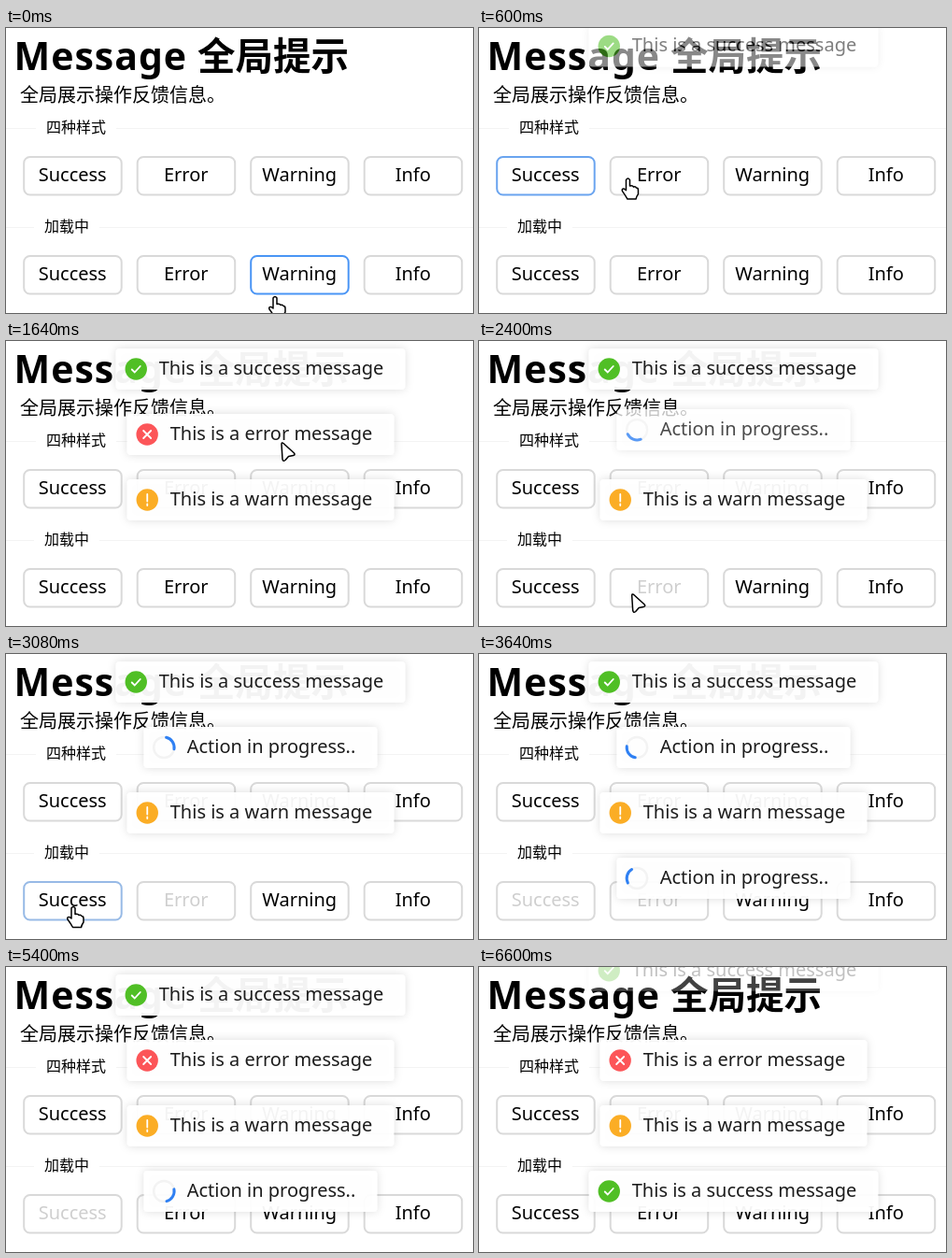
Write an HTML page that moves like this. It is 500 px wide and 305 px high and loops after 6720 ms.

```html
<!DOCTYPE html>
<html lang="zh">
<head>
<meta charset="utf-8">
<title>Message</title>
<style>
html, body { margin: 0; width: 100%; height: 100%; overflow: hidden; background: #fff; }
svg { display: block; width: 500px; height: 305px; }
text { font: 20px "Noto Sans", "Noto Sans CJK SC", "Noto Sans CJK", sans-serif; fill: #000; }
.title { font-size: 41px; font-weight: 700; letter-spacing: 1px; }
.title.cjk { font-size: 40.5px; letter-spacing: 0; }
.head { font-size: 16px; }
.btn { text-anchor: middle; }
.msg text { fill: #1c1c1c; }
.line { stroke: #f3f3f3; }
.cursor { fill: #fff; stroke: #000; stroke-width: 1.5; stroke-linejoin: round; }
</style>
</head>
<body>
<svg id="stage" viewBox="0 0 500 305">
  <defs>
    <filter id="shadow" x="-10%" y="-50%" width="120%" height="200%">
      <feDropShadow dx="0" dy="0" stdDeviation="5" flood-color="#000" flood-opacity=".14"/>
    </filter>
  </defs>
  <text class="title" x="8.5" y="44.5">Message</text>
  <text class="title cjk" x="205" y="45">全局提示</text>
  <text x="15" y="79">全局展示操作反馈信息。</text>
  <path class="line" d="M0 107.5H32M118 107.5H500M0 213.5H30M100 213.5H500"/>
  <text class="head" x="43" y="112">四种样式</text>
  <text class="head" x="41" y="218">加载中</text>
</svg>
<script>
const LOOP = 6720, LAST = 6600, LOADING = 2850, SPIN = 1140, REST = 180;
const stage = document.getElementById('stage');

function add(parent, tag, attrs, text) {
  const el = document.createElementNS('http://www.w3.org/2000/svg', tag);
  for (const k in attrs) el.setAttribute(k, attrs[k]);
  if (text) el.textContent = text;
  parent.appendChild(el);
  return el;
}

const clamp = v => Math.min(1, Math.max(0, v));
const mix = (a, b, p) => a + (b - a) * p;
const easeOut = u => 1 - (1 - clamp(u)) ** 2;
const easeInOut = u => u < .5 ? 4 * u ** 3 : 1 - 4 * (1 - u) ** 3;

// Places the pointer visits; it arrives REST ms before each click
const stops = [
  { x: 288, y: 287, click: 0 },
  { x: 78, y: 162, click: 500 },
  { x: 196, y: 160, click: 856 },
  { x: 297, y: 160, click: 1180 },
  { x: 295, y: 109, click: 1820 },
  { x: 167, y: 271, click: 2238 },
  { x: 72, y: 270, click: 3210 },
  { x: 62, y: 315, click: 3780 }
];
const [, onSuccess, onError, onWarning, , onLoadError, onLoadSuccess] = stops.map(s => s.click);

const buttons = [];
const hits = (b, p) => Math.abs(p.x - b.x) < 57 && Math.abs(p.y - b.y) < 25;
for (const y of [158, 264]) {
  ['Success', 'Error', 'Warning', 'Info'].forEach((name, i) => {
    const b = { x: 71.2 + i * 121.5, y };
    const g = add(stage, 'g', { class: 'btn' });
    b.box = add(g, 'rect', { x: b.x - 52, y: y - 20, width: 104.5, height: 40.5, rx: 6.5, fill: '#fff', 'stroke-width': 2 });
    b.label = add(g, 'text', { x: b.x, y: y + 5.5 }, name);
    b.stop = stops.find(s => hits(b, s));
    b.loads = y > 200 && b.stop && b.stop.click > 0;
    buttons.push(b);
  });
}

const kinds = {
  success: { color: '#50bf25', mark: 'M-4.5 .5L-1.5 3.5L4.5 -3', text: 'This is a success message' },
  error: { color: '#fc5558', mark: 'M-4 -4L4 4M4 -4L-4 4', text: 'This is a error message' },
  warn: { color: '#fbad25', mark: 'M0 -6V1.5M0 4.5V6', text: 'This is a warn message' },
  load: { text: 'Action in progress..' }
};
const messages = [];

function show(kind, slot, from, to = LOOP, slides = true) {
  const { color, mark, text } = kinds[kind], y = 30 + slot * 70;
  const g = add(stage, 'g', { class: 'msg' });
  const box = add(g, 'rect', { y: y - 22, height: 44, rx: 4, fill: '#fff', 'fill-opacity': .95, filter: 'url(#shadow)' });
  const label = add(g, 'text', { y: y + 6 }, text);
  const width = label.getComputedTextLength() + 69, x = 272.5 - width / 2;
  box.setAttribute('x', x);
  box.setAttribute('width', width);
  label.setAttribute('x', x + 46);
  const icon = add(g, 'g', { transform: `translate(${x + 21.5} ${y})`, fill: 'none', 'stroke-linecap': 'round' });
  let arc;
  if (color) {
    add(icon, 'circle', { r: 11.7, fill: color });
    add(icon, 'path', { d: mark, stroke: '#fff', 'stroke-width': 1.8 });
  } else {
    add(icon, 'circle', { r: 11, stroke: '#f3f3f3', 'stroke-width': 2.5 });
    arc = add(icon, 'path', { d: 'M8 -7.5A11 11 0 0 1 8 7.5', stroke: '#2f80f3', 'stroke-width': 3 });
  }
  messages.push({ g, arc, from, to, slides });
}

// A loading message that turns into its result in place
function load(result, slot, from) {
  show('load', slot, from, from + LOADING);
  show(result, slot, from + LOADING, LOOP, false);
}

show('success', 0, onSuccess, 6456);
show('error', 1, onError, 1700);
show('warn', 2, onWarning);
load('error', 1, onLoadError);
load('success', 3, onLoadSuccess);

const hand = add(stage, 'path', { class: 'cursor', d: 'M-2 2Q0 -1 2 2V8.5Q5 7.5 6 9.5Q8 8.5 9 10.5Q11 10.5 11 13V17Q9 20 8.5 22.5H-.5Q-3 18 -6 14Q-7 11 -4 11.5L-2 13Z' });
const arrow = add(stage, 'path', { class: 'cursor', d: 'M0 1.5Q0 -1 2 .5L13.5 11Q15 13 12.5 13.5L7.5 14.5L4 18.5Q1.5 20.5 1 17.5Z' });

function pointer(t) {
  const i = stops.findIndex(s => t < s.click);
  if (i < 1) return stops[i < 0 ? stops.length - 1 : 0];
  const a = stops[i - 1], b = stops[i];
  const p = easeInOut(clamp((t - a.click) / (b.click - REST - a.click)));
  return { x: mix(a.x, b.x, p), y: mix(a.y, b.y, p) };
}

function drawButton(b, t) {
  const since = b.stop ? t - b.stop.click : LOOP;
  b.off = b.loads && since >= 0 && since < LOADING;
  const glow = b.off ? 0 : clamp(Math.min(1 + since / 240, 1 - since / 450));
  b.box.setAttribute('stroke', `rgb(${mix(217, 74, glow)},${mix(217, 149, glow)},${mix(217, 245, glow)})`);
  b.label.style.fill = b.off ? '#cfcfcf' : '#000';
}

function drawMessage(m, t) {
  const live = t >= m.from && (m.slides && !m.arc || t < m.to);
  const enter = m.slides ? easeOut((t - m.from) / 300) : 1;
  const leave = easeOut((t - m.to) / 300);
  m.g.setAttribute('opacity', live ? enter * (1 - leave) : 0);
  m.g.setAttribute('transform', `translate(0 ${-24 * (1 - enter) - 36 * leave})`);
  if (m.arc) m.arc.setAttribute('transform', `rotate(${60 + (t - m.from) * 360 / SPIN})`);
}

function render(t) {
  buttons.forEach(b => drawButton(b, t));
  messages.forEach(m => drawMessage(m, t));
  const p = pointer(t), over = buttons.some(b => !b.off && hits(b, p));
  for (const c of [hand, arrow]) {
    c.setAttribute('transform', `translate(${p.x} ${p.y})`);
    c.style.display = (c === hand) === over ? '' : 'none';
  }
}

const start = performance.now();
function tick() {
  render(Math.min(LAST, (performance.now() - start) % LOOP));
  requestAnimationFrame(tick);
}
tick();
</script>
</body>
</html>
```
